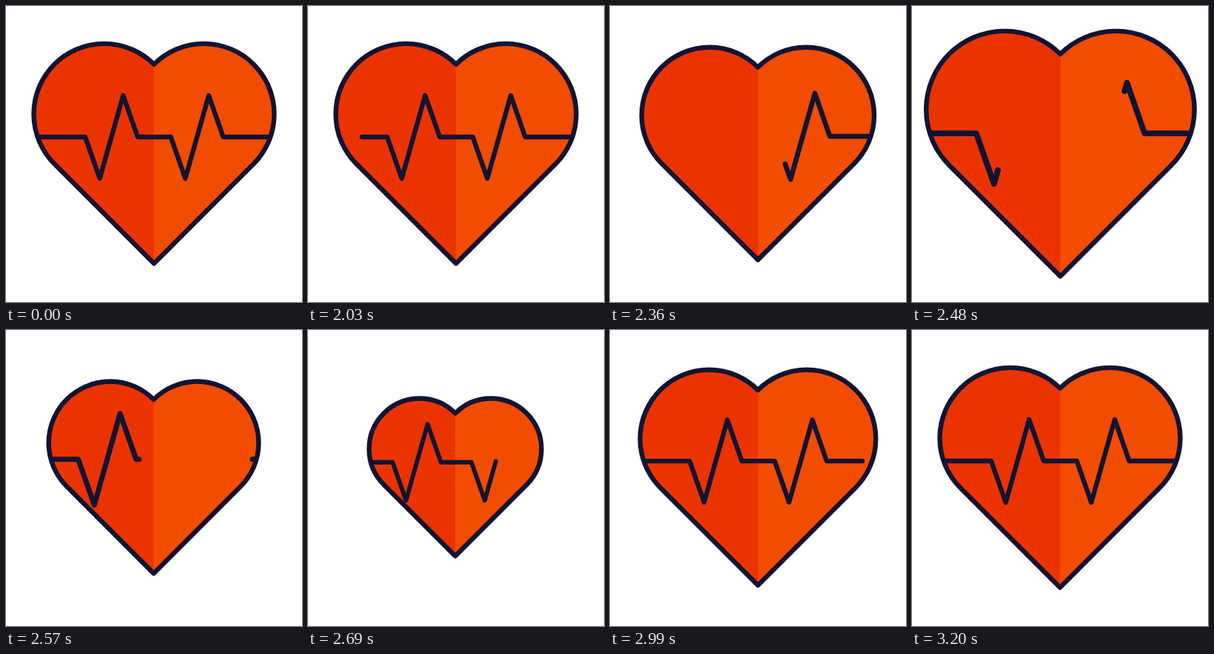
Animation, 400 px wide and 400 px high, one loop 3230 ms. Source, as an HTML page:

```html
<!DOCTYPE html>
<html lang="en">
<head>
<meta charset="utf-8">
<title>Heartbeat</title>
<style>
  html, body { margin: 0; height: 100%; overflow: hidden; background: #fff; }
  svg { display: block; width: 100%; height: 100%; }
  .line { fill: none; stroke: #121331; stroke-width: 6.4; stroke-linecap: round; stroke-linejoin: round; }
</style>
</head>
<body>
<svg viewBox="0 0 400 400">
  <defs>
    <path id="heart" d="M200 78.8A95 95 0 0 0 65.3 213.2L200 348 334.7 213.2A95 95 0 0 0 200 78.8Z"/>
    <clipPath id="inside"><use href="#heart" class="beat"/></clipPath>
  </defs>
  <g class="beat">
    <use href="#heart" fill="#eb3300"/>
    <path fill="#f24c00" d="M200 78.8V348L334.7 213.2A95 95 0 0 0 200 78.8Z"/>
  </g>
  <g clip-path="url(#inside)">
    <path id="pulse" class="line" d="M36 177H107L126.7 233 158.3 121 178 177H222.7L242.3 233 274 121 293.5 177H364"/>
  </g>
  <path class="line beat" vector-effect="non-scaling-stroke" d="M200 78.8A95 95 0 0 0 65.3 213.2L200 348 334.7 213.2A95 95 0 0 0 200 78.8Z"/>
</svg>
<script>
const LOOP = 3230, REST = 2030, STEP = 30;
const pulse = document.getElementById('pulse');
const beating = document.querySelectorAll('.beat');
const length = pulse.getTotalLength();

// Cubic bezier easing with control points (x1, 0) and (x2, 1)
const bezier = (x1, x2) => u => {
  if (u <= 0) return 0;
  if (u >= 1) return 1;
  let lo = 0, hi = 1, s;
  for (let i = 0; i < 24; i++) {
    s = (lo + hi) / 2;
    const x = 3 * s * (1 - s) * ((1 - s) * x1 + s * x2) + s ** 3;
    if (x < u) lo = s; else hi = s;
  }
  return s * s * (3 - 2 * s);
};
const smooth = bezier(1 / 3, 2 / 3);
const drawEase = bezier(0.3, 0.2);

// Two contractions around one swell, seven steps each, then a long settle
function beat(step, low, high, settleSteps, settle) {
  const values = [1, low, high, low, 1];
  const leg = Math.max(0, Math.min(3, Math.floor(step / 7)));
  const u = (step - leg * 7) / (leg < 3 ? 7 : settleSteps);
  const k = (leg < 3 ? smooth : settle)(u);
  return values[leg] + (values[leg + 1] - values[leg]) * k;
}
const heartSettle = bezier(1 / 6, 0);
const pulseSettle = bezier(1 / 3, 0.05);

const scaleAbout = (x, y, s) => `translate(${x} ${y}) scale(${s}) translate(${-x} ${-y})`;

function render(t) {
  const step = Math.max(-1, Math.floor((t - REST) / STEP));
  const heartScale = scaleAbout(196.5, 198, beat(step, 0.7, 1.14, 18, heartSettle));
  beating.forEach(el => el.setAttribute('transform', heartScale));
  pulse.setAttribute('transform', scaleAbout(199, 199.5, beat(step - 1, 0.92, 1.22, 17, pulseSettle)));

  const erased = step < 0 ? 0 : Math.min(37 + 32 * step, length + 20);
  const drawn = Math.min(erased, length * drawEase((step - 9) / 30));
  pulse.setAttribute('stroke-dasharray', `${drawn} ${erased - drawn} ${length + 40} 0`);
}

const start = performance.now();
function tick() {
  render((performance.now() - start) % LOOP);
  requestAnimationFrame(tick);
}
tick();
</script>
</body>
</html>
```
